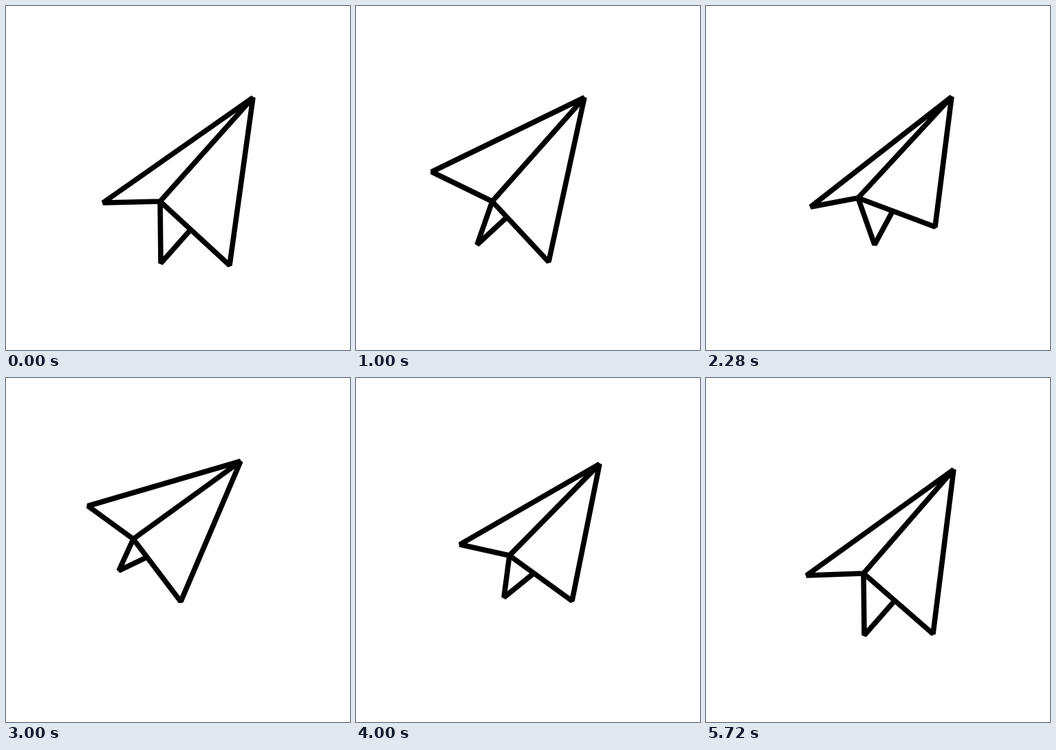
An HTML page for the animation above (5760 ms loop, 500x500 px).

```html
<!DOCTYPE html>
<html lang="en">
<head>
<meta charset="utf-8">
<title>Paper plane</title>
<style>
  html, body { margin: 0; width: 100%; height: 100%; overflow: hidden; background: #fff; }
  svg { display: block; width: 100%; height: 100%; }
  path { fill: none; stroke: #000; stroke-width: 7.6; stroke-linejoin: bevel; }
</style>
</head>
<body>
<svg viewBox="0 0 500 500"><path id="plane"/></svg>
<script>
const LOOP = 5760, STEP = 40;

// time, nose, left tip, fold, right tip, keel (x, y each), keel joint in % of fold to right tip
const poses = [
  [0,    359, 133, 141, 286, 224, 284, 325, 377, 225, 374, 44],
  [120,  354, 133, 132, 275, 217, 284, 311, 377, 211, 369, 39],
  [600,  336, 133, 114, 247, 201, 284, 286, 373, 182, 351, 28],
  [1000, 332, 133, 110, 241, 198, 284, 280, 372, 176, 347, 26],
  [1800, 358, 133, 146, 286, 222, 282, 324, 332, 232, 352, 42],
  [2280, 357, 132, 152, 292, 221, 279, 333, 321, 245, 347, 45],
  [3000, 341, 121, 119, 186, 185, 234, 254, 325, 164, 280, 29],
  [3600, 340, 121, 122, 196, 192, 238, 265, 325, 172, 290, 30],
  [4000, 354, 125, 151, 242, 223, 258, 314, 324, 215, 319, 39],
  [4720, 368, 129, 187, 304, 263, 285, 379, 322, 271, 361, 42],
  [5400, 367, 131, 175, 298, 252, 284, 363, 346, 258, 367, 44],
  [5720, 360, 133, 146, 287, 229, 284, 330, 372, 230, 374, 45]
];

const count = poses.length;
const pose = i => poses[(i + count) % count];
const span = i => (pose(i + 1)[0] - pose(i)[0] + LOOP) % LOOP;
const slope = (i, k) => (pose(i + 1)[k] - pose(i)[k]) / span(i);

function tangent(i, k) {
  const before = span(i - 1), after = span(i);
  return (slope(i - 1, k) * after + slope(i, k) * before) / (before + after);
}

// Periodic cubic Hermite curve through column k
function valueAt(i, k, u) {
  const a = pose(i)[k], b = pose(i + 1)[k], h = span(i);
  const v = 1 - u;
  return a * v * v * (1 + 2 * u) + b * u * u * (3 - 2 * u)
    + h * u * v * (v * tangent(i, k) - u * tangent(i + 1, k));
}

const plane = document.getElementById("plane");

function draw(time) {
  let i = count - 1;
  while (poses[i][0] > time) i--;
  const u = (time - poses[i][0]) / span(i);
  const at = k => valueAt(i, k, u);
  const [nose, left, fold, right, keel] = [1, 3, 5, 7, 9].map(k => [at(k), at(k + 1)]);
  const part = at(11) / 100;
  const joint = fold.map((c, n) => c + (right[n] - c) * part);
  const line = (...points) => "M" + points.map(p => p.map(c => c.toFixed(2))).join("L");
  plane.setAttribute("d",
    line(nose, left, fold) + "Z" + line(nose, fold, right) + "Z" + line(fold, keel, joint));
}

const start = performance.now();
function tick() {
  const time = (performance.now() - start) % LOOP;
  draw(Math.floor(time / STEP) * STEP);
  requestAnimationFrame(tick);
}
tick();
</script>
</body>
</html>
```
